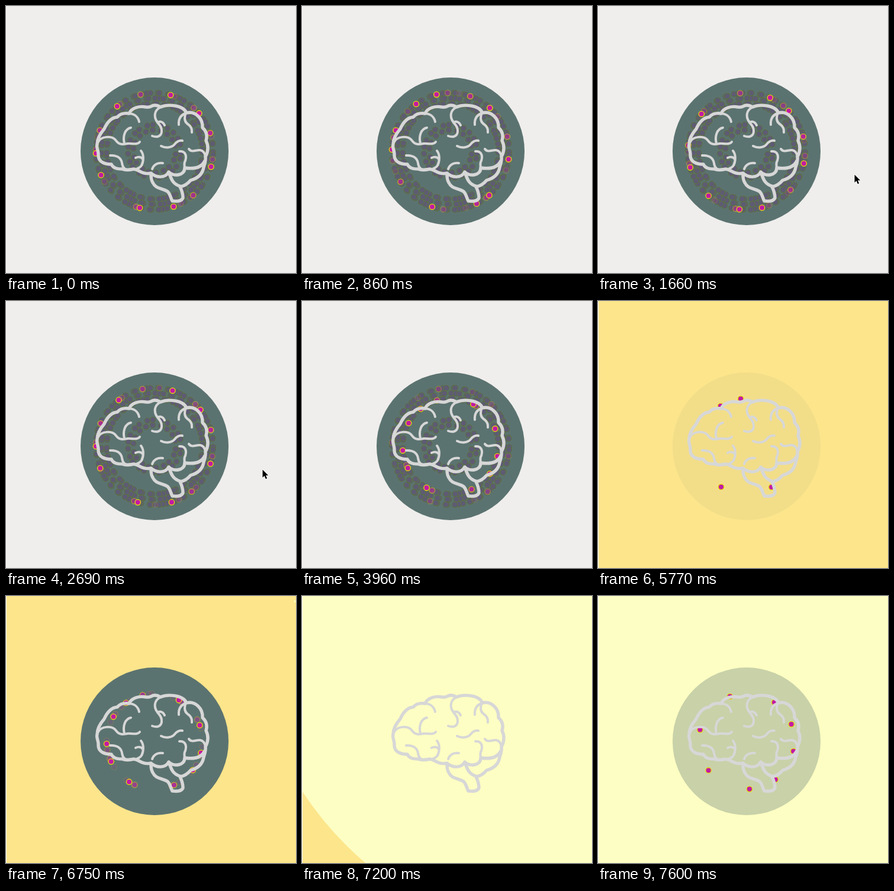
Write an HTML page with a canvas that moves like this. It is 490 px wide and 452 px high and loops after 7700 ms.

```html
<!DOCTYPE html>
<html lang="en">
<head>
<meta charset="utf-8">
<title>Brain orbit</title>
<style>
  html, body { margin: 0; width: 100%; height: 100%; overflow: hidden; background: #efeeec; }
  canvas { display: block; }
</style>
</head>
<body>
<canvas id="stage" width="490" height="452"></canvas>
<script>
const ctx = document.getElementById('stage').getContext('2d');
const LOOP = 7700, TAU = Math.PI * 2;
const CX = 251, CY = 246, DISC = 125;
const GREY = '#efeeec', YELLOW = '#fce58b', PALE = '#fdfec3', TEAL = '#5b7370';
const STEP = 32;        // ms between two dots
const CELL = 360 / 97;  // smallest angle between neighbouring dots

const outline = new Path2D(`M154 234 C154 224 160 215 166 208 C170 199 177 189 188 188
  C193 182 201 181 208 182 C212 172 226 169 236 171 C240 172 242 171 245 170 C250 167 256 168 261 171
  C273 166 299 167 305 181 C319 177 333 190 332 206 C340 213 340 221 338 228
  C342 236 342 246 337 255 C338 262 336 267 334 273 C332 285 323 292 312 295
  C307 301 301 305 294 306 C298 314 299 320 299 325 C296 331 289 331 281 330
  C278 325 278 319 273 314 C264 308 253 310 248 299 C245 294 245 291 245 286
  M154 234 C152 240 157 246 156 253 C156 264 167 268 178 268 C182 276 191 276 197 276
  C203 279 211 277 216 276 C226 277 229 286 245 283 C254 291 269 292 275 281
  C282 289 302 288 302 274 C315 276 330 275 336 262
  M275 281 C279 292 281 301 294 305`);

const folds = new Path2D(`M156 230 C160 221 179 218 186 228 C192 236 199 234 205 233 S222 236 226 230
  M200 233 C197 220 201 208 211 206 M207 182 C216 182 223 187 225 196
  M176 253 C188 252 195 258 196 266 C197 273 200 277 206 277
  M228 245 C233 251 233 262 229 270 C226 275 220 276 216 277 M219 257 C223 255 228 255 231 259
  M247 220 C255 223 262 221 263 213 C264 205 259 201 256 197 C249 188 250 176 262 171
  M256 197 C261 194 266 197 268 202
  M262 237 C270 241 280 240 285 234 C289 229 293 227 298 228 M247 276 C250 268 257 265 265 266
  M293 246 C302 245 306 252 303 262 C300 266 302 272 302 275
  M309 242 C314 249 321 243 328 244 C334 245 336 249 337 255
  M292 201 C291 190 296 184 305 181 M304 181 C301 187 301 195 306 199 C312 203 315 207 314 214`);

const pointer = new Path2D('M0 0 V13.5 L3.1 10.6 L5.3 15.7 L7.6 14.7 L5.5 9.7 H9.7 Z');

// Angles the dot hops between, clockwise from the top
const wideA = [353.6, 15.9, 49.5, 71.8, 105.3, 138.7, 161, 194.6, 246, 268, 291, 320.3];
const wideB = [1.2, 23.7, 46.2, 75.4, 102, 131.3, 164.7, 187, 220.5, 254, 276, 309.7];
const tight = [353, 30.4, 70.4, 104, 127, 156, 212, 245, 267, 301, 323.5];
const last = [13.5, 35.5, 69.1, 102, 143, 176.5, 232.6, 284, 339.8];

const phases = [
  { from: -1200, to: 900, anchor: 34, r: 99, spots: wideA, turn: 0 },
  { from: 900, to: 2100, anchor: 1694, r: 99, spots: wideB, turn: 0 },
  { from: 2100, to: 3500, anchor: 2724, r: 99, spots: wideA, turn: 2 },
  { from: 3500, to: 5400, anchor: 3994, r: 81, spots: tight, turn: -2 },
  { from: 5660, to: 7320, anchor: 6784, r: 81, spots: tight, turn: 0 },
  { from: 7320, to: 7610, anchor: 7634, r: 81, spots: last, turn: 0 }
];

const mod = (a, n) => ((a % n) + n) % n;
const clamp = v => Math.max(0, Math.min(1, v));

function disc(x, y, r, fill) {
  ctx.beginPath();
  ctx.arc(x, y, r, 0, TAU);
  ctx.fillStyle = fill;
  ctx.fill();
}

function dot(deg, r, fill, line) {
  const a = deg * Math.PI / 180;
  disc(CX + r * Math.sin(a), CY - r * Math.cos(a), 4.7, fill);
  ctx.strokeStyle = line;
  ctx.stroke();
}

function drawGhosts() {
  ctx.lineWidth = 1.3;
  for (const r of [36, 45, 81, 90, 99]) {
    const count = Math.round(r * (r < 50 ? 0.5 : 0.75));
    for (let i = 0; i < count; i++) {
      dot(i * 360 / count + r + 2 * Math.sin(i * 9), r, '#5e5b74', '#5c7048');
    }
  }
}

function drawTrail(t, born) {
  ctx.lineWidth = 1.3;
  for (const { from, to, anchor, r, spots, turn } of phases) {
    const n = spots.length;
    const end = Math.ceil((Math.min(t, to) - anchor) / STEP);
    const start = Math.ceil((Math.max(t - 1200, from, born) - anchor) / STEP);
    for (let k = start; k < end; k++) {
      const age = t - anchor - k * STEP;
      const glow = Math.min(1, Math.exp((250 - age) / 220));
      if (born < 0 && glow < 0.1) continue;
      const slot = mod((k + 1) * 5, n), lap = mod(Math.floor(k / n) + 1, 3);
      const shift = lap ? ((lap + slot) % 2 ? CELL : -2 * CELL) : 0;
      ctx.globalAlpha = Math.max(glow, 0.12);
      dot(spots[slot] + turn + shift, r, '#c41aa4', '#e8dc08');
    }
  }
  ctx.globalAlpha = 1;
}

function drawOrbit(t) {
  if (t >= 5400 && t < 5660) return;
  const born = t < 5400 ? -9000 : t < 7320 ? 5660 : 7320;
  ctx.globalAlpha = 1 - Math.exp(-(((t - born) / 442) ** 2));
  disc(CX, CY, DISC, TEAL);
  ctx.globalAlpha = 1;
  if (born < 0) drawGhosts();
  drawTrail(t, born);
}

function wipe(t, start, color) {
  const p = (t - start) / 580;
  if (p > 0 && p < 1) disc(488, 9, 690 * p * (1.4 - 0.4 * p), color);
}

function drawBrain() {
  ctx.strokeStyle = '#d7d7d7';
  ctx.lineCap = ctx.lineJoin = 'round';
  ctx.lineWidth = 5.4;
  ctx.stroke(outline);
  ctx.lineWidth = 4;
  ctx.stroke(folds);
}

function drawPointer(t) {
  if (t < 1250 || t > 3800) return;
  const come = (1 - clamp((t - 1250) / 300)) ** 2;
  const go = clamp((t - 3550) / 250) ** 2;
  ctx.save();
  ctx.translate(433.5 + 28 * come + 26 * go, 285.5 + 58 * come + 30 * go);
  ctx.lineWidth = 2;
  ctx.strokeStyle = '#fff';
  ctx.stroke(pointer);
  ctx.fillStyle = '#000';
  ctx.fill(pointer);
  ctx.restore();
}

function draw(now) {
  const t = Math.min(now % LOOP, 7600);
  ctx.fillStyle = t < 5360 ? GREY : t < 7330 ? YELLOW : PALE;
  ctx.fillRect(0, 0, 490, 452);
  drawOrbit(t);
  wipe(t, 4780, YELLOW);
  wipe(t, 6750, PALE);
  drawBrain();
  drawPointer(t);
  ctx.fillStyle = '#fff';
  ctx.fillRect(0, 0, 1, 452);
}

const begin = performance.now();
function tick() {
  draw(performance.now() - begin);
  requestAnimationFrame(tick);
}
tick();
</script>
</body>
</html>
```
